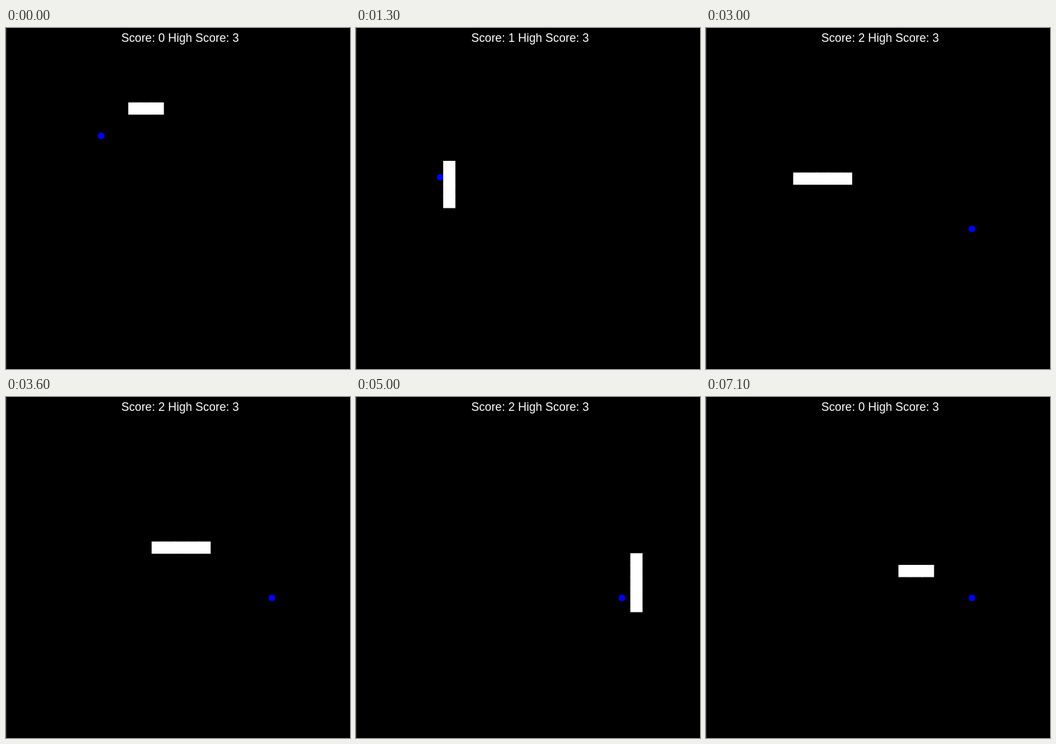
An HTML page with a canvas that plays this animation: 520x516 px, repeating every 7.3 s.

```html
<!DOCTYPE html>
<html lang="en">
<head>
<meta charset="utf-8">
<title>Snake</title>
<style>
  html, body { margin: 0; width: 100%; height: 100%; overflow: hidden; background: #000; }
  canvas { display: block; }
</style>
</head>
<body>
<canvas id="stage" width="520" height="516"></canvas>
<script>
const ctx = document.getElementById('stage').getContext('2d');
const TICK = 100, PITCH = 17.68, SIZE = 18.5, LEFT = 96.4, TOP = 112.6, REACH = 13.3;
const HIGH_SCORE = 3;

// One letter per tick: a step, '.' for a pause, 'X' for the crash and restart.
const MOVES = '..LLLDD.DDDDDD.DDLLU.UUURR.RRRRR.RRRRRRR.RRRRD.DDDDDL.LUUURRR.RRRRX.RRRR.';
const STEPS = { L: [-1, 0], R: [1, 0], U: [0, -1], D: [0, 1] };
const FOODS = [[143.8, 163.2], [127.5, 226], [402, 304]];

const cellX = col => LEFT + col * PITCH;
const cellY = row => TOP + row * PITCH;

function touches([col, row], [x, y]) {
  return Math.hypot(cellX(col) + SIZE / 2 - x, cellY(row) + SIZE / 2 - y) < REACH;
}

function playGame() {
  let body = [[5, 0], [6, 0], [7, 0]];
  let length = 3, score = 0, food = 0;
  return [...MOVES].map(move => {
    if (move === 'X') {
      body = [[9, 8], [8, 8], [7, 8]];
      length = 3;
      score = 0;
    } else if (move !== '.') {
      const [dx, dy] = STEPS[move];
      body = [[body[0][0] + dx, body[0][1] + dy], ...body].slice(0, length);
      if (touches(body[0], FOODS[food])) {
        length++;
        score++;
        food++;
      }
    }
    return { body, score, food: FOODS[food] };
  });
}

const states = playGame();

function draw({ body, score, food }) {
  ctx.fillStyle = '#000';
  ctx.fillRect(0, 0, 520, 516);
  ctx.fillStyle = '#2c2c2c';
  ctx.fillRect(0, 0, 1, 516);

  ctx.fillStyle = '#00f';
  ctx.beginPath();
  ctx.arc(...food, 5.1, 0, Math.PI * 2);
  ctx.fill();

  ctx.fillStyle = '#fff';
  for (const [col, row] of body) ctx.fillRect(cellX(col), cellY(row), SIZE, SIZE);

  ctx.font = '17.7px "Liberation Sans", Arial, sans-serif';
  ctx.textAlign = 'center';
  ctx.fillText(`Score: ${score} High Score: ${HIGH_SCORE}`, 263.2, 21);
}

const start = performance.now();
function frame() {
  const tick = Math.floor((performance.now() - start) / TICK);
  draw(states[tick % states.length]);
  requestAnimationFrame(frame);
}
frame();
</script>
</body>
</html>
```
